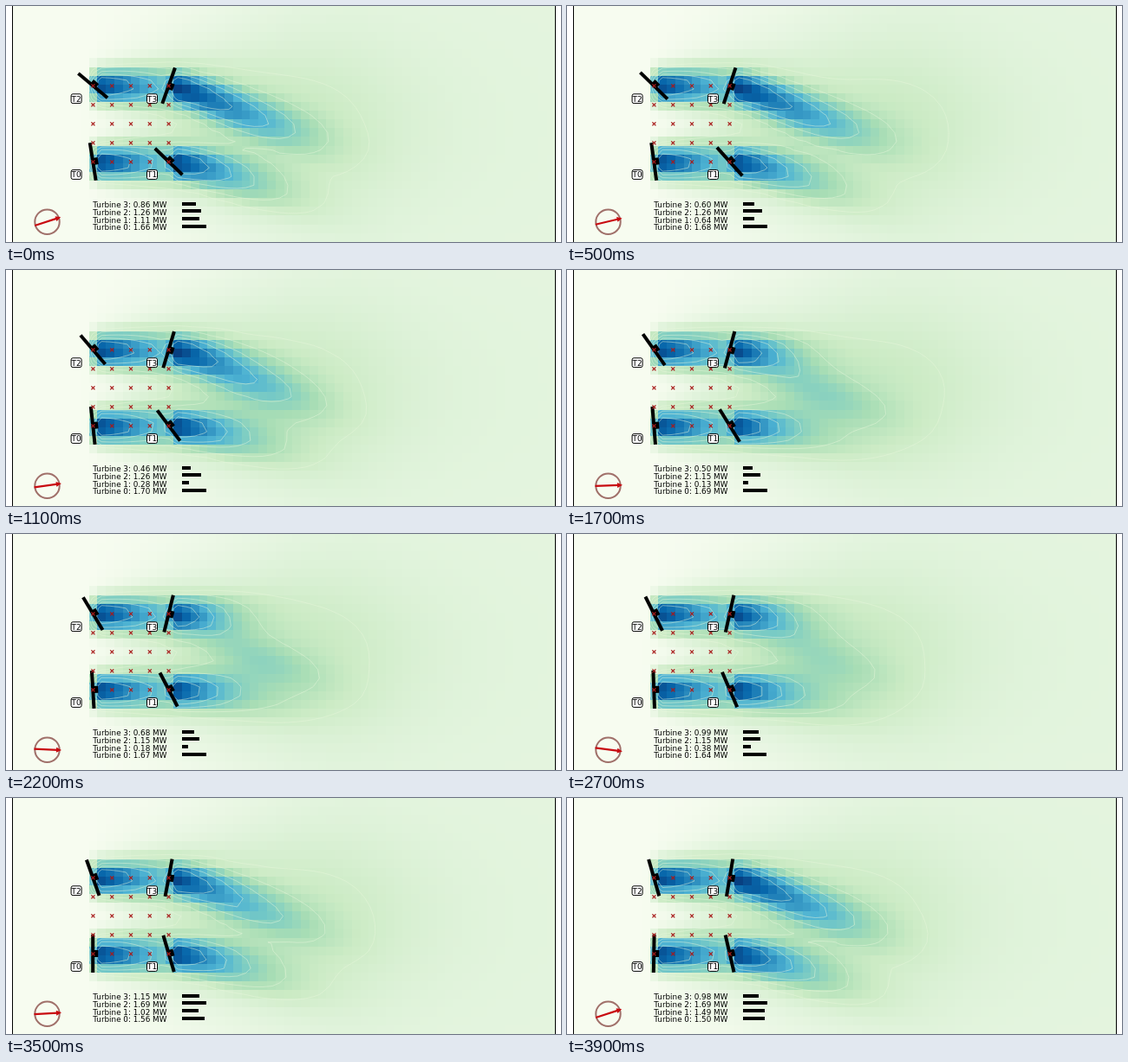
Animation, 640 px wide and 273 px high, one loop 4 s. Source, as an HTML page with a canvas:

```html
<!DOCTYPE html>
<html lang="en">
<head>
<meta charset="utf-8">
<title>Wind farm wakes</title>
<style>
  html, body { margin: 0; width: 100%; height: 100%; overflow: hidden; background: #fff; }
  canvas { display: block; }
</style>
</head>
<body>
<canvas id="stage" width="640" height="273"></canvas>
<script>
const ctx = document.getElementById('stage').getContext('2d');
const STEPS = 40, STEP_MS = 100;
const COLS = 64, ROWS = 27, LEFT = 7.5, CELL_W = 626 / COLS, CELL_H = 273 / ROWS;
const LEVELS = [.22, .33, .47, .6, .75];
const PALETTE = ['f7fcf0', 'e0f3db', 'ccebc5', 'a8ddb5', '7bccc4', '4eb3d3', '2b8cbe', '0868ac', '084081']
  .map(hex => [0, 2, 4].map(i => parseInt(hex.substr(i, 2), 16)));

const clamp = v => Math.max(0, Math.min(1, v));
const mix = (a, b, k) => a + (b - a) * k;
const gauss = (d, s) => Math.exp(-d * d / (2 * s * s));
const rad = deg => deg * Math.PI / 180;
// Cosine that repeats `cycles` times per loop and peaks at step `peak`.
const wave = (step, peak, cycles = 1) => Math.cos(2 * Math.PI * cycles * (step - peak) / STEPS);

// Yaw turns steadily from one angle to the other; power is in MW.
const TURBINES = [
  { x: 100.2, y: 180, yaw: [9, -1], power: s => 1.7 - .00028 * (s - 12.5) ** 2 },
  { x: 187.6, y: 180, yaw: [46, 13], power: s => .13 + .00305 * (s - 17.9) ** 2 },
  { x: 100.2, y: 92.2, yaw: [50, 16], power: s => s < 14 ? 1.26 : s < 35 ? 1.15 : 1.69 },
  { x: 187.6, y: 92.2, yaw: [-19.5, -9.5],
    power: s => Math.min(.45 + .0026 * (s - 12.6) ** 2, .98 + .0425 * (39 - s)) }
];

// The wind veers steadily, then swings back.
const windAngle = s => s < 31 ? mix(18, -11, s / 31) : mix(-11, 18, (s - 31) / 8);

function colour(v) {
  const p = clamp(v) * (PALETTE.length - 1), i = Math.min(PALETTE.length - 2, Math.floor(p));
  return `rgb(${PALETTE[i].map((c, n) => Math.round(mix(c, PALETTE[i + 1][n], p - i)))})`;
}

// Slow spread over the farm, a core behind each rotor, and old wakes drifting on from the front row.
function deficit(x, y, step) {
  const swing = wave(step, 2), reach = 22 * wave(step, 5, 3);
  const k = clamp((x - 80) / 350);
  let base = .1 * k * k * (3 - 2 * k) + .12 * gauss(x - 345 - reach, 88) * gauss(y - 140, 64);
  let core = 0;
  TURBINES.forEach((t, i) => {
    if (x < t.x - 2) return;
    const u = Math.max(0, x - t.x), d = y - t.y - 1;
    const front = i % 2 === 0, upper = i > 1;
    const bend = front ? 0 : (upper ? 8 : 5) * (1 + swing) * (u / 62) ** 1.4;
    const length = front ? 85 : 72 + 9 * swing;
    const amp = (front ? .96 : .8) * (u < 5 ? .62 : 1);
    const across = Math.exp(-((Math.abs(d - bend) / (19 + .08 * u)) ** 2.5));
    core = Math.max(core, amp * Math.exp(-((u / length) ** 1.5)) * across);
    if (!front) return;
    base += .2 * clamp(u / 100) * Math.exp(-u / 150) * gauss(d, 28 + .11 * u);
    const drop = upper ? 44 - 5 * swing : 24 + 10 * swing;
    const drift = upper ? .22 + .05 * wave(step, 9) : .1;
    base += drift * gauss(u - 175, 60) * gauss(d - drop * (u / 190) ** 1.2, 19);
  });
  return base + core;
}

function drawField(step) {
  const cx = c => LEFT + (c + .5) * CELL_W, cy = r => (r + .5) * CELL_H;
  const edgeX = c => Math.round(LEFT + c * CELL_W), edgeY = r => Math.round(r * CELL_H - .2);
  const field = [];
  for (let r = 0; r < ROWS; r++) {
    field.push([]);
    for (let c = 0; c < COLS; c++) {
      const v = field[r][c] = deficit(cx(c), cy(r), step);
      ctx.fillStyle = colour(v);
      ctx.fillRect(edgeX(c), edgeY(r), edgeX(c + 1) - edgeX(c), edgeY(r + 1) - edgeY(r) + 1);
    }
  }
  // Contours by marching squares.
  ctx.beginPath();
  for (const level of LEVELS)
    for (let r = 0; r < ROWS - 1; r++)
      for (let c = 0; c < COLS - 1; c++) {
        const corners = [[c, r], [c + 1, r], [c + 1, r + 1], [c, r + 1]];
        const hits = [];
        corners.forEach(([c0, r0], i) => {
          const [c1, r1] = corners[(i + 1) % 4];
          const a = field[r0][c0], b = field[r1][c1];
          if (a < level === b < level) return;
          const k = (level - a) / (b - a);
          hits.push([cx(mix(c0, c1, k)), cy(mix(r0, r1, k))]);
        });
        hits.forEach((p, i) => i % 2 ? ctx.lineTo(...p) : ctx.moveTo(...p));
      }
  ctx.strokeStyle = 'rgba(232,246,220,.6)';
  ctx.lineWidth = .8;
  ctx.stroke();
}

function line(x0, y0, x1, y1, width, style) {
  ctx.strokeStyle = style;
  ctx.lineWidth = width;
  ctx.beginPath();
  ctx.moveTo(x0, y0);
  ctx.lineTo(x1, y1);
  ctx.stroke();
}

function text(string, x, y, align) {
  ctx.fillStyle = '#000';
  ctx.font = '8.8px "DejaVu Sans", sans-serif';
  ctx.textAlign = align;
  ctx.fillText(string, x, y);
}

function drawTurbine(t, step) {
  ctx.save();
  ctx.translate(t.x, t.y);
  ctx.rotate(-rad(mix(...t.yaw, step / (STEPS - 1))));
  ctx.fillStyle = '#000';
  ctx.fillRect(-2, -22, 4, 44);
  ctx.fillRect(0, -4, 6, 8);
  ctx.restore();
}

function drawMarkers() {
  for (let r = 0; r < 5; r++)
    for (let c = 0; c < 5; c++) {
      const x = 100.4 + c * 21.8, y = 92.4 + r * 22;
      line(x - 2, y - 2, x + 2, y + 2, 1.3, '#a81c1c');
      line(x - 2, y + 2, x + 2, y - 2, 1.3, '#a81c1c');
    }
}

function drawLabel(t, i) {
  const x = t.x - 19.1, y = t.y + 15;
  ctx.beginPath();
  ctx.roundRect(x - 6, y - 5.4, 12, 10.8, 2);
  ctx.fillStyle = '#fff';
  ctx.fill();
  ctx.strokeStyle = '#000';
  ctx.lineWidth = 1;
  ctx.stroke();
  text('T' + i, x, Math.round(y + 3.4), 'center');
}

function drawPower(t, i, step) {
  const power = t.power(step), row = 3 - i;
  text(`Turbine ${i}: ${power.toFixed(2)} MW`, 100.3, Math.round(233.2 + row * 8.7), 'left');
  ctx.fillRect(203, Math.floor(227 + row * 8.7), Math.round(4 + 14.2 * power), 4);
}

function drawWind(step) {
  ctx.strokeStyle = '#a0706a';
  ctx.lineWidth = 2;
  ctx.beginPath();
  ctx.arc(47.5, 249.7, 14.2, 0, 7);
  ctx.stroke();
  ctx.save();
  ctx.translate(47.5, 249.3);
  ctx.rotate(-rad(windAngle(step)));
  line(-15, 0, 12, 0, 2.2, '#c80a10');
  ctx.fillStyle = '#c80a10';
  ctx.beginPath();
  ctx.moveTo(16.5, 0);
  ctx.lineTo(10.5, -3);
  ctx.lineTo(10.5, 3);
  ctx.fill();
  ctx.restore();
}

function draw(step) {
  ctx.fillStyle = '#fff';
  ctx.fillRect(0, 0, 640, 273);
  drawField(step);
  for (const x of [7.5, 633.5]) line(x, 0, x, 273, 1, '#000');
  TURBINES.forEach(t => drawTurbine(t, step));
  drawMarkers();
  TURBINES.forEach(drawLabel);
  TURBINES.forEach((t, i) => drawPower(t, i, step));
  drawWind(step);
}

let shown = -1;
function tick() {
  const step = Math.floor(performance.now() / STEP_MS) % STEPS;
  if (step !== shown) draw(shown = step);
  requestAnimationFrame(tick);
}
tick();
</script>
</body>
</html>
```
